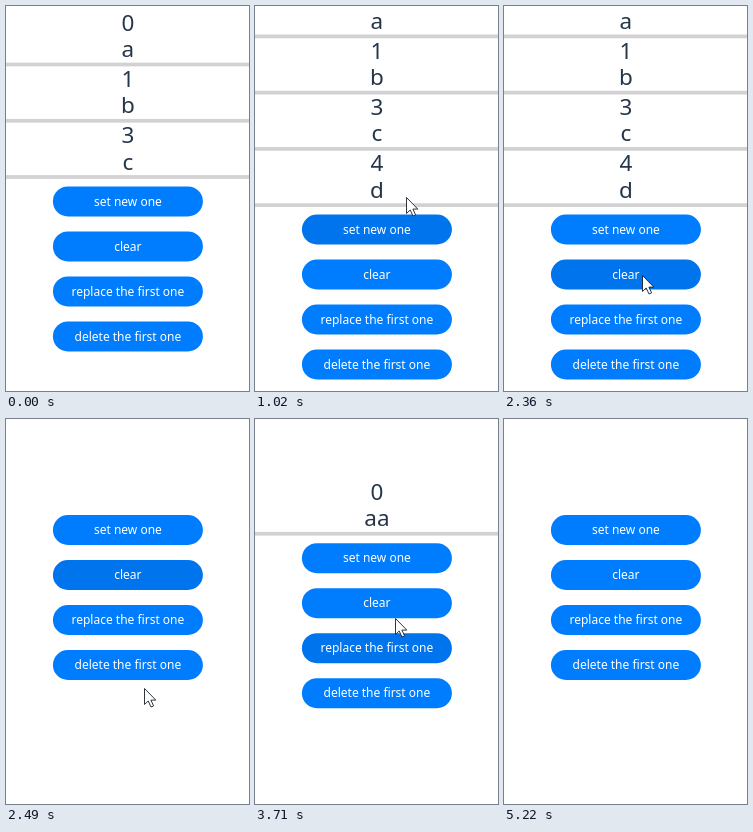
An HTML page with a canvas for the animation above (5.57 s loop, 243 by 385 pixels).

```html
<!DOCTYPE html>
<html lang="en">
<head>
<meta charset="utf-8">
<title>List demo</title>
<style>
  html, body { margin: 0; width: 100%; height: 100%; overflow: hidden; background: #fff; }
  canvas { display: block; width: 243px; height: 385px; }
</style>
</head>
<body>
<canvas id="stage"></canvas>
<script>
const W = 243, H = 385, LOOP = 5570, CX = 121.9;
const LINE = 26.25, RULE = 3.75, ITEM = 2 * LINE + RULE;
const FONT = '"Noto Sans", "Open Sans", sans-serif';
const LABELS = ['set new one', 'clear', 'replace the first one', 'delete the first one'];

const base = [['0', 'a'], ['1', 'b'], ['3', 'c']];
const lists = [
  { at: 0, items: base },
  { at: 1020, items: [...base, ['4', 'd']] },
  { at: 2490, items: [] },
  { at: 3710, items: [['0', 'aa']] },
  { at: 4730, items: [] }
];

// Button presses: darkens in a few steps, then lets go.
const presses = [
  { button: 0, from: 610, to: 1090, steps: 4 },
  { button: 1, from: 2230, to: 2560, steps: 2 },
  { button: 2, from: 3300, to: 3780, steps: 4 },
  { button: 3, from: 4460, to: 4800, steps: 3 }
];

const linear = u => u;
const easeIn = u => u * u;
const easeOut = u => 1 - (1 - u) * (1 - u);
const easeInOut = u => u * u * (3 - 2 * u);

// Each move continues from where the previous one ended.
const START = [226, 410];
const moves = [
  { from: 70, to: 410, steps: 6, end: [151, 191], ease: easeOut },
  { from: 1290, to: 1700, steps: 6, end: [138, 269], ease: easeInOut },
  { from: 2760, to: 3030, steps: 4, end: [138, 211], ease: easeInOut },
  { from: 3570, to: 3640, steps: 2, end: [140, 199], ease: linear },
  { from: 3920, to: 4060, steps: 3, end: [141, 271], ease: easeInOut },
  { from: 4600, to: 4660, steps: 2, end: [143, 271], ease: linear },
  { from: 4870, to: 5010, steps: 3, end: [181, 348], ease: easeIn },
  { from: 5080, to: 5150, steps: 2, end: [213, 380], ease: linear }
];
const SHOW = 70, HIDE = 5220;

const canvas = document.getElementById('stage');
const ctx = canvas.getContext('2d');
const dpr = window.devicePixelRatio || 1;
canvas.width = Math.round(W * dpr);
canvas.height = Math.round(H * dpr);
ctx.scale(dpr, dpr);
ctx.textAlign = 'center';

function text(str, y, size, color) {
  ctx.font = `${size}px ${FONT}`;
  ctx.fillStyle = color;
  ctx.fillText(str, CX, y);
}

function pressLevel(button, t) {
  const p = presses.find(p => p.button === button && t >= p.from && t < p.to);
  return p ? Math.min(1, (Math.floor((t - p.from) / 70) + 1) / p.steps) : 0;
}

function drawList(items, top) {
  items.forEach((lines, i) => {
    const y = top + i * ITEM;
    lines.forEach((str, j) => text(str, y + (j + 0.5) * LINE + 7.6, 22.5, '#25364a'));
    ctx.fillStyle = '#d2d2d5';
    ctx.fillRect(0, y + 2 * LINE, W, RULE);
  });
}

function drawButtons(top, t) {
  LABELS.forEach((label, i) => {
    const y = top + i * 45;
    const k = pressLevel(i, t);
    ctx.fillStyle = `rgb(0, ${125 - 9 * k}, ${255 - 18 * k})`;
    ctx.beginPath();
    ctx.roundRect(CX - 75, y, 150, 30, 15);
    ctx.fill();
    text(label, y + 19.2, 12, '#fff');
  });
}

function cursorAt(t) {
  let pos = START;
  for (const m of moves) {
    if (t < m.from) break;
    const slot = (m.to - m.from) / (m.steps - 1);
    const k = Math.min(m.steps, Math.floor((t - m.from) / slot + 1e-6) + 1);
    const u = m.ease(k / m.steps);
    pos = pos.map((v, i) => v + (m.end[i] - v) * u);
  }
  return pos;
}

const arrow = new Path2D('M.5 .5V16.5L4.2 13L7 19L9.6 17.9L6.9 12.1H11.8Z');

function drawCursor(t) {
  if (t < SHOW || t >= HIDE) return;
  const [x, y] = cursorAt(t);
  ctx.save();
  ctx.translate(x, y);
  ctx.fillStyle = '#fff';
  ctx.fill(arrow);
  ctx.strokeStyle = '#1a1f28';
  ctx.lineWidth = 0.9;
  ctx.stroke(arrow);
  ctx.restore();
}

function draw(t) {
  const { items } = lists.filter(l => t >= l.at).pop();
  const n = items.length;
  const top = 96 + n * ITEM / 2;
  ctx.fillStyle = '#fff';
  ctx.fillRect(0, 0, W, H);
  drawList(items, top - 7.5 - n * ITEM);
  drawButtons(top, t);
  drawCursor(t);
}

const began = performance.now();
function tick() {
  draw((performance.now() - began) % LOOP);
  requestAnimationFrame(tick);
}
tick();
</script>
</body>
</html>
```
